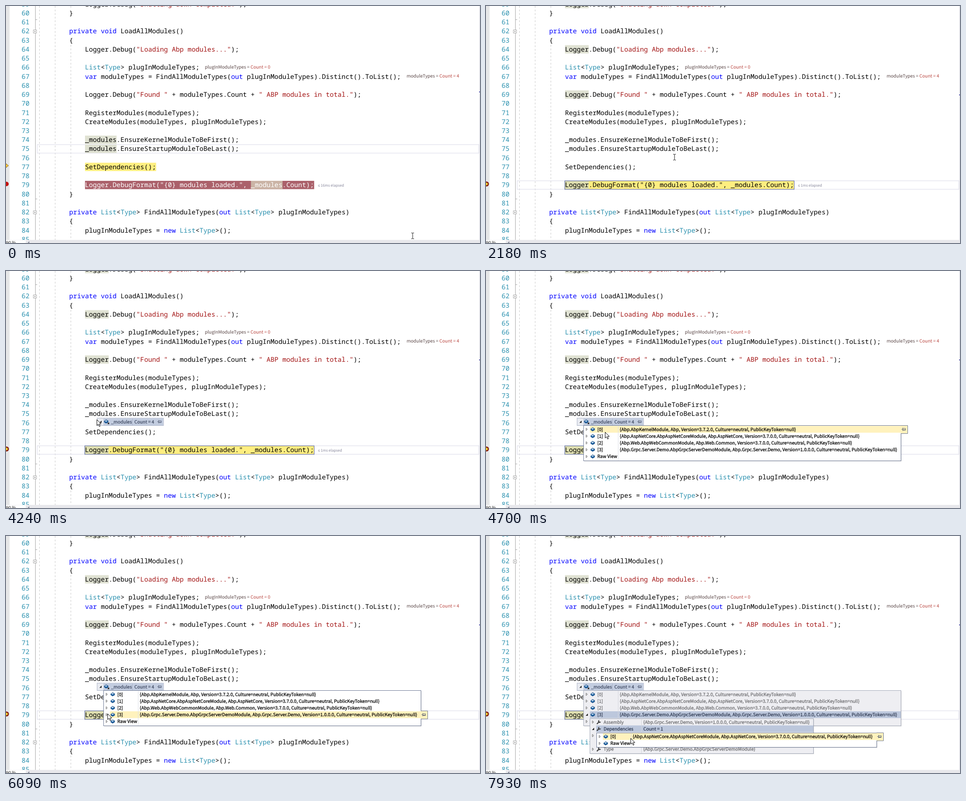
Write an HTML page that moves like this. It is 1056 px wide and 530 px high and loops after 8 s.

```html
<!DOCTYPE html>
<html lang="en">
<head>
<meta charset="utf-8">
<title>Debugger session</title>
<style>
  html, body { margin: 0; width: 100%; height: 100%; overflow: hidden; background: #fff; }
  svg { display: block; width: 100vw; height: 100vh; }
  text { white-space: pre; text-rendering: geometricPrecision; font-kerning: none; }
  .code { font: 14.67px "Noto Sans Mono", "DejaVu Sans Mono", monospace; }
  .ui { font: 10.03px "Noto Sans CJK SC", "Noto Sans CJK JP", "Noto Sans", sans-serif; }
  .tip { stroke-width: .3px; }
  .small { font-size: 8.1px; }
  .sign { font-family: "Noto Sans", sans-serif; }
</style>
</head>
<body>
<svg viewBox="0 0 1056 530" preserveAspectRatio="none">
  <g id="editor"></g>
  <g id="tips"></g>
  <g id="pointer"></g>
</svg>
<script>
const LOOP = 8000, TICK = 77.1;
const COL = 8.802, LEFT = 140.8;
const YELLOW = '#ffee80', WORD = '#e0e2d3', MAROON = '#ab616b';

const esc = s => s.replace(/&/g, '&amp;').replace(/</g, '&lt;');
const rect = (x, y, w, h, fill, more = '') =>
  `<rect x="${x}" y="${y}" width="${w}" height="${h}" fill="${fill}" ${more}/>`;
const path = (d, stroke, fill = 'none', more = '') =>
  `<path d="${d}" stroke="${stroke}" fill="${fill}" ${more}/>`;
const text = (x, y, cls, fill, body) =>
  `<text x="${x}" y="${y}" class="${cls}" fill="${fill}">${body}</text>`;
const at = (x, y, body) => `<g transform="translate(${x} ${y})">${body}</g>`;
const baseline = line => 21 + (line - 60) * 20.23;
const column = n => LEFT + n * COL;

// ---- editor ----
const CODE = {
  59: '    Logger.Debug("Shutting down completed.");',
  60: '}',
  62: 'private void LoadAllModules()',
  63: '{',
  64: '    Logger.Debug("Loading Abp modules...");',
  66: '    List<Type> plugInModuleTypes;',
  67: '    var moduleTypes = FindAllModuleTypes(out plugInModuleTypes).Distinct().ToList();',
  69: '    Logger.Debug("Found " + moduleTypes.Count + " ABP modules in total.");',
  71: '    RegisterModules(moduleTypes);',
  72: '    CreateModules(moduleTypes, plugInModuleTypes);',
  74: '    _modules.EnsureKernelModuleToBeFirst();',
  75: '    _modules.EnsureStartupModuleToBeLast();',
  77: '    SetDependencies();',
  80: '}',
  82: 'private List<Type> FindAllModuleTypes(out List<Type> plugInModuleTypes)',
  83: '{',
  84: '    plugInModuleTypes = new List<Type>();'
};
const LAST_LINE = 'Logger.DebugFormat("{0} modules loaded.", _modules.Count);';

const TOKENS = /("[^"]*")|\b(private|void|var|out|new)\b|\b(List|Type)\b|[^"\w]+|\w+/g;
const colour = source => source.replace(TOKENS, (s, str, key, type) => {
  const fill = str ? '#a31515' : key ? '#0000ff' : type ? '#2b91af' : '';
  return fill ? `<tspan fill="${fill}">${esc(s)}</tspan>` : esc(s);
});

const mark = (line, col, chars, fill) =>
  rect(column(col), baseline(line) - 14.4, chars * COL, 18.6, fill);
const codeAt = (line, col, fill, body) => text(column(col), baseline(line), 'code', fill, body);

function hint(x, y, name, count) {
  return text(x, y, 'ui', '#5a4646', `${name} = <tspan fill="#b8443e">Count = ${count}</tspan>`);
}

function gutterMarks(arrived) {
  const arrow = 'M-4 -2H0V-4.5L5.5 0L0 4.5V2H-4Z';
  if (arrived) {
    return `<circle cx="1" cy="398" r="5.5" fill="#8c1a10"/>` +
      at(0, 398, path('M-4 -2.2H.5V-4L5 0L.5 4V2.2H-4Z', '#6b4a00', '#ffd83a', 'stroke-width=".5"'));
  }
  return `<circle cx="1" cy="398" r="5" fill="#c4100c"/>` +
    at(0, 357, path(arrow, '#8a6414', '#ffc83c'));
}

function fixedParts() {
  let out = rect(0, 0, 8, 530, '#e6e7e8');
  out += path('M65.5 0V524M65.5 30.5h4M65.5 431.5h4', '#a5a5a5');
  for (const y of [57, 461.5]) {
    out += rect(61, y - 3.5, 7, 7, '#fff', 'stroke="#a5a5a5"') + path(`M63 ${y}h3`, '#555');
  }
  out += path('M74.5 0V524M109.5 0V524M144.5 0V6M144.5 87V411M144.5 491V524',
    '#c9c9c9', 'none', 'stroke-dasharray="4 4"');
  return out;
}

function codeText() {
  let out = '';
  for (let n = 59; n <= 85; n++) {
    out += text(34.8, baseline(n), 'code', '#2b91af', n);
    if (CODE[n]) out += codeAt(n, 0, '#000', colour(CODE[n]));
  }
  return out + hint(443, 140, 'plugInModuleTypes', 0) + hint(892.5, 160, 'moduleTypes', 4);
}

function frameParts(stepped) {
  return rect(0, 523, 1056, 7, '#e8e8ec') + rect(0, 523.5, 44, 7, '#fff') +
    text(0, 533, 'ui', '#222', '90 %') + path('M48 530L52 526V530Z', 'none', '#868999') +
    rect(1054, 0, 2, 523, '#e8e8ec') + rect(1054, stepped ? 198 : 191.5, 2, 1.5, '#1a1a9c');
}

function editor(stepped, arrived) {
  const line = stepped ? 79 : 75;
  let out = fixedParts() + gutterMarks(arrived);
  out += rect(69.5, baseline(line) - 14.5, 984, 19, 'none', 'stroke="#e3e3ee" stroke-width="1.4"');
  out += stepped ? mark(79, 4, 58, YELLOW) : mark(77, 4, 18, YELLOW) + mark(79, 4, 58, MAROON);
  if (arrived) {
    for (const n of [59, 64, 69]) out += mark(n, 4, 6, WORD);
    out += mark(79, 4, 6, '#dfdfb0');
  } else {
    for (const n of [74, 75]) out += mark(n, 4, 8, WORD);
    out += mark(79, 46, 8, stepped ? '#dfdfb0' : '#cbb4a6');
  }
  if (stepped) {
    out += rect(175.5, 391, 511, 19, 'none', 'stroke="#4a5aa0"');
  }
  out += codeText() + codeAt(79, 4, stepped ? '#000' : '#fff', LAST_LINE);
  out += text(695, 403.5, 'ui small', '#85859a',
    `<tspan class="sign">≤</tspan> ${stepped ? 1 : 16}ms elapsed`);
  return out + frameParts(stepped);
}

// ---- data tips ----
const about = (type, assembly, version) =>
  `{Abp.${type}, Abp${assembly}, Version=${version}, Culture=neutral, PublicKeyToken=null}`;
const CORE = about('AspNetCore.AbpAspNetCoreModule', '.AspNetCore', '3.7.0.0');
const DEMO = '{Abp.Grpc.Server.Demo.AbpGrpcServerDemoModule}';

const LIST = {
  x: 217.5, y: 345.5, w: 707, h: 79, first: 354, icon: cube, gap: 295, value: 298,
  rows: [
    ['[0]', about('AbpKernelModule', '', '3.7.2.0')],
    ['[1]', CORE],
    ['[2]', about('Web.AbpWebCommonModule', '.Web.Common', '3.7.0.0')],
    ['[3]', about('Grpc.Server.Demo.AbpGrpcServerDemoModule', '.Grpc.Server.Demo', '1.0.0.0')],
    ['Raw View', '']
  ]
};
const MODULE = {
  x: 231.5, y: 408.5, w: 498, h: 78, first: 416, icon: wrench, gap: 347, value: 350.5,
  rows: [
    ['Assembly', '{Abp.Grpc.Server.Demo, Version=1.0.0.0, Culture=neutral, PublicKeyToken=null}'],
    ['Dependencies', 'Count = 1'],
    ['Instance', DEMO],
    ['IsLoadedAsPlugIn', 'false'],
    ['Type', DEMO]
  ]
};
const DEPENDENCY = {
  x: 246.5, y: 440.5, w: 624, h: 32, first: 448.5, icon: cube, gap: 324, value: 327,
  rows: [['[0]', CORE], ['Raw View', '']]
};
const PITCH = 15.2, EXPANDER_CELL = 14;

function cube() {
  return path('M-4 -1L0 -3.8L4.5 -1.5V1.5L0 4L-4 1.5Z', '#0b3f78', '#1c5f9f', 'stroke-width=".8"') +
    path('M-3 -1L0 -2.8L3.2 -1.3L0 .5Z', 'none', '#d5e8f8');
}
function wrench() {
  return path('M-4.5 4.5L0 0', '#444', 'none', 'stroke-width="2.4"') +
    path('M1 -4.5A3.2 3.2 0 1 0 4.5 -1L2 -.5L.5 -2Z', 'none', '#444');
}
const pin = (x, y) => at(x, y,
  path('M-5 0H-2M-2 -3.5V3.5M-2 -2H4V2H-2M-2 1H4', '#4c566e', 'none', 'stroke-width=".9"'));
const expander = (x, y, open) => at(x, y, open
  ? path('M2.5 -2.5V2.5H-2.5Z', 'none', '#222')
  : path('M-1.5 -2.8L1.5 0L-1.5 2.8Z', '#555', '#fff', 'stroke-width=".9"'));
const label = (x, y, fill, body) =>
  `<g stroke="${fill}">${text(x, y + 3.6, 'ui tip', fill, body)}</g>`;

function panel(p, hot, open) {
  const dim = open >= 0, right = p.x + p.w;
  const cell = p.x + EXPANDER_CELL, barWidth = p.w - EXPANDER_CELL;
  let out = rect(p.x + 1.5, p.y + 1.5, p.w, p.h, '#000', 'opacity=".1"') +
    rect(p.x, p.y, p.w, p.h, dim ? '#eeeef2' : '#fff', `stroke="${dim ? '#a3a9b8' : '#6b7793'}"`);
  const rowY = i => p.first + i * PITCH;
  if (dim) out += rect(cell, rowY(open) - 7.6, barWidth - .5, PITCH, '#bcc7dc');
  else if (hot >= 0) {
    const y = rowY(hot);
    out += rect(cell, y - 7.6, barWidth, PITCH, '#fff2bd') +
      path(`M${right - .5} ${y - 8.5}H${right + 15}V${y + 9.5}H${right - .5}`, '#6b7793', '#fff2bd') +
      pin(right + 6, y);
  }
  out += path(`M${p.gap - .5} ${p.y + 1}V${p.y + p.h - 1}`, dim ? '#d4d6dc' : '#dcdfe6');
  p.rows.forEach(([name, value], i) => {
    const y = rowY(i), fill = !dim ? '#000' : i === open ? '#2f3a52' : '#6d6d70';
    if (value !== 'false') out += expander(p.x + 7, y, i === open);
    out += at(p.x + 20, y, p.icon()) + label(p.x + 30.5, y, fill, name) + label(p.value, y, fill, value);
  });
  return out;
}

function header() {
  return rect(203, 329, 148, 16.5, '#e9ebf1', 'stroke="#a7b0c6"') +
    rect(217, 329.5, 133, 15.5, '#c3cde0') + expander(210.5, 337, true) +
    at(223, 336.5, cube()) + rect(226.5, 339, 3.5, 3.5, '#333') +
    label(234, 337, '#414b63', '_modules') + path('M281.5 330V345', '#a7b0c6') +
    label(286, 337, '#414b63', 'Count = 4') + pin(342, 337);
}

const rowUnder = (p, x, y) => {
  const i = Math.floor((y - p.y) / PITCH);
  return x >= p.x - 8 && i >= 0 && i < p.rows.length ? i : -1;
};

function tips(time, x, y) {
  if (time < 4150) return '';
  let out = header();
  if (time < 4380) return out;
  out += panel(LIST, rowUnder(LIST, x, y), time >= 6300 ? 3 : -1);
  if (time >= 6450) {
    const hot = time >= 6770 ? rowUnder(MODULE, x, y) : -1;
    out += panel(MODULE, hot, time >= 7460 ? 1 : -1);
  }
  if (time >= 7460) out += panel(DEPENDENCY, rowUnder(DEPENDENCY, x, y), -1);
  return out;
}

// ---- pointer ----
const ROUTE = [
  [0, 906, 514], [308, 405, 385], [386, 405, 385], [848, 332, 352], [1003, 332, 352],
  [1079, 390, 382], [1156, 465, 362], [1310, 365, 336], [1697, 365, 336], [2560, 468, 340],
  [2880, 290, 463], [3315, 100, 322], [3392, 134, 403], [3624, 197, 301], [3701, 163, 321],
  [3856, 163, 321], [4086, 195, 326], [4395, 209, 338], [4703, 265, 360], [4780, 266, 376],
  [4858, 266, 376], [4935, 258, 358], [5089, 240, 354], [5244, 240, 354], [6090, 226, 397],
  [6708, 226, 397], [6862, 234, 418], [7016, 244, 436], [7093, 244, 454], [7171, 244, 454],
  [7248, 241, 420], [7325, 239, 429], [7710, 239, 429], [7941, 322, 452]
];

function pointerAt(time) {
  const next = ROUTE.findIndex(key => key[0] > time);
  if (next < 0) return ROUTE[ROUTE.length - 1].slice(1);
  const [t0, x0, y0] = ROUTE[next - 1], [t1, x1, y1] = ROUTE[next];
  const f = (time - t0) / (t1 - t0);
  return [x0 + (x1 - x0) * f, y0 + (y1 - y0) * f].map(Math.round);
}

const BEAM = path('M-3 -6.5H-.8L0 -5.7L.8 -6.5H3M0 -6V6M-3 6.5H-.8L0 5.7L.8 6.5H3', '#111');
const ARROW = path('M.5 .5V13.5L3.6 10.7L5.8 15.8L7.9 14.9L5.7 10H9.8Z', '#000', '#fff');

// ---- playback ----
const cache = {};
function show(id, html) {
  if (cache[id] === html) return;
  cache[id] = html;
  document.getElementById(id).innerHTML = html;
}

const start = performance.now();
let shownTick = -1;
function play(now) {
  const elapsed = Math.max(0, now - start) % LOOP;
  const tick = Math.floor((elapsed + 15) / TICK);
  if (tick !== shownTick) {
    shownTick = tick;
    const time = tick * TICK;
    const [x, y] = pointerAt(time);
    show('editor', editor(time >= 1450, time >= 1750));
    show('tips', tips(time, x, y));
    show('pointer', at(x, y, time < 4150 ? BEAM : ARROW));
  }
  requestAnimationFrame(play);
}
play(start);
</script>
</body>
</html>
```
